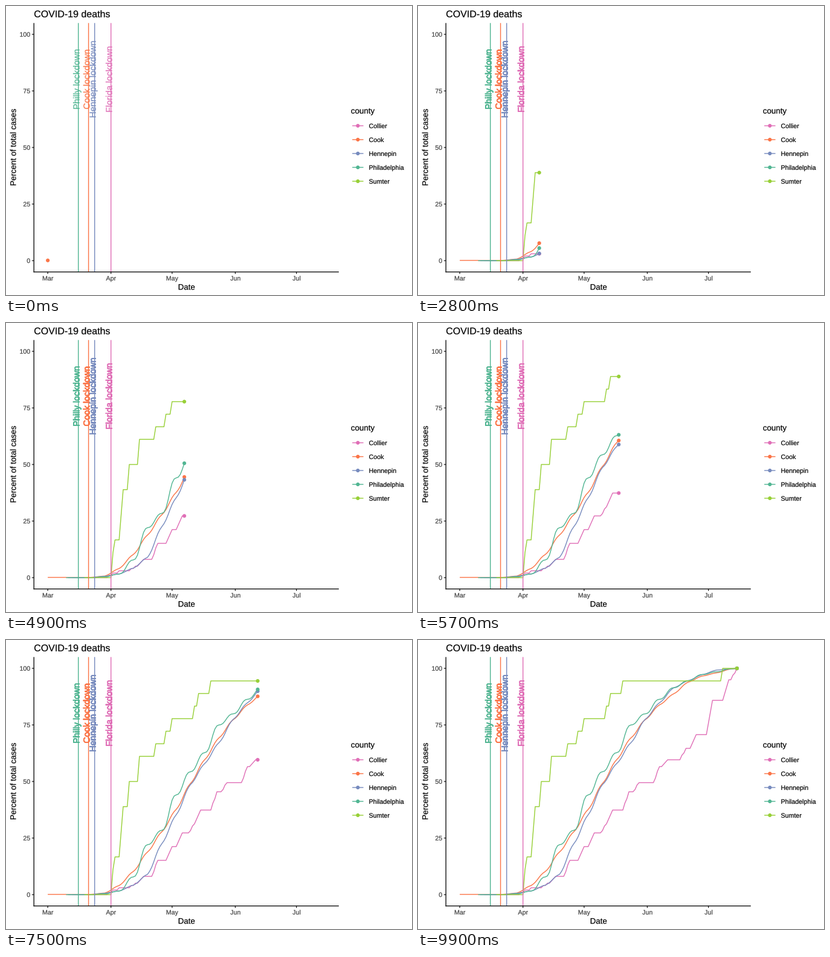
These frames come from a looping animation (672 by 480 pixels, 10 s). A matplotlib script:

```python
import matplotlib.pyplot as plt
import numpy as np
from matplotlib.animation import FuncAnimation
from matplotlib.patches import Circle, PathPatch
from matplotlib.textpath import TextPath
from matplotlib.transforms import Affine2D

W, H, DPI = 672, 480, 96
FRAMES, LAST = 100, 136
LEFT, RIGHT, TOP, BOTTOM = 46.2, 550.85, 28.3, 441.7
PT = 72 / DPI  # points per pixel
DAY = np.arange(LAST + 1)  # days since 1 March

PINK, ORANGE, BLUE = "#e06fb7", "#fb7548", "#778bbe"
TEAL, GREEN = "#52b693", "#98d038"
TICK, TICK_TEXT = "#242424", "#404040"

plt.rcParams.update({
    "path.snap": False,
    "lines.solid_capstyle": "butt",
    "lines.solid_joinstyle": "round",
})


def X(day):
    return LEFT + (day / LAST + 0.05) / 1.1 * (RIGHT - LEFT)


def Y(pct):
    return BOTTOM - (pct / 100 + 0.05) / 1.1 * (BOTTOM - TOP)


def weekly(rhythm, *levels):
    """Percent from levels seven days apart, slowing down every weekend."""
    weeks = 21 + 7 * np.arange(len(levels))
    pct = np.interp(DAY - rhythm * np.sin(2 * np.pi * DAY / 7), weeks, levels)
    return 100 * pct / pct[-1]


def steps(ramp, counts):
    """Percent from whole counts that climb to each key day, then hold."""
    days, level = [0], [0]
    for day, count in counts.items():
        days += [max(days[-1], day - ramp), day]
        level += [level[-1], count]
    return 100 * np.round(np.interp(DAY, days, level)) / level[-1]


# name, colour, first day with data, percent per day
SERIES = [
    ("Collier", PINK, 12, steps(3, {
        32: 2, 36: 3, 43: 5, 47: 8, 54: 15, 61: 21, 66: 27, 72: 31, 75: 37,
        83: 45, 88: 49, 98: 56, 102: 59, 111: 64, 116: 70, 124: 85, 132: 94,
        136: 99})),
    ("Cook", ORANGE, 0, weekly(
        0.4, 0.1, 0.7, 4, 10.2, 18.8, 27.7, 37.5, 48.9, 59.4, 69, 77, 83.5,
        88.4, 93.5, 96.2, 97.6, 99.3, 100)),
    ("Hennepin", BLUE, 10, weekly(
        0.4, 0, 0.6, 1.6, 4.2, 9, 22.5, 35.2, 48.5, 57.8, 67, 77.3, 84.6,
        91.2, 94.3, 97, 99, 99.6, 100)),
    ("Philadelphia", TEAL, 9, weekly(
        1, 0, 0.4, 1.6, 7.8, 22, 28.3, 43.9, 54.1, 62.5, 74.7, 79.6, 86,
        91.1, 94.2, 96.9, 98.1, 99.4, 100)),
    ("Sumter", GREEN, 18, steps(1, {
        32: 2, 33: 3, 36: 5, 37: 7, 40: 9, 45: 11, 53: 12, 58: 13, 61: 14,
        72: 15, 74: 16, 80: 17, 129: 18})),
]
LOCKDOWNS = [("Philly", TEAL, 15), ("Cook", ORANGE, 20),
             ("Hennepin", BLUE, 23), ("Florida", PINK, 31)]

fig = plt.figure(figsize=(W / DPI, H / DPI), dpi=DPI, facecolor="white")
ax = fig.add_axes([0, 0, 1, 1])
ax.set(xlim=(0, W), ylim=(H, 0))
ax.axis("off")


def line(x, y, color, width=1.42, z=2):
    return ax.plot(x, y, color=color, lw=width * PT, zorder=z)[0]


def dot(x, y, color):
    return ax.add_artist(Circle((x, y), 3.08, fc=color, lw=0, zorder=3))


def text(x, y, s, size, color="black", align=0, angle=0, z=6):
    """Outlined text on a baseline; align runs from 0 (left) to 1 (right)."""
    path = TextPath((0, 0), s, size=size, prop={"family": "Liberation Sans"})
    shift = -align * path.get_extents().x1
    place = Affine2D().translate(shift, 0).scale(1, -1).rotate_deg(-angle).translate(x, y)
    return ax.add_artist(PathPatch(path, fc=color, ec=color, lw=0.15, zorder=z,
                                   transform=place + ax.transData))


def draw_axes():
    text(LEFT, 18.7, "COVID-19 deaths", 16)
    text((LEFT + RIGHT) / 2, 471.2, "Date", 13.33, align=0.5)
    text(16.4, (TOP + BOTTOM) / 2, "Percent of total cases", 13.33, align=0.5, angle=90)
    for pct in range(0, 101, 25):
        y = Y(pct)
        line([LEFT - 3.33, LEFT], [y, y], TICK, 1.29)
        text(LEFT - 6.4, y + 3.83, str(pct), 10.67, TICK_TEXT, align=1)
    for month, day in zip(("Mar", "Apr", "May", "Jun", "Jul"), (0, 31, 61, 92, 122)):
        x = X(day)
        line([x, x], [BOTTOM, BOTTOM + 3.33], TICK, 1.29)
        text(x, 455.9, month, 10.67, TICK_TEXT, align=0.5)
    line([LEFT, LEFT], [TOP, BOTTOM + 0.6], "black", 1.29, 7)
    line([LEFT - 0.6, RIGHT], [BOTTOM, BOTTOM], "black", 1.29, 7)


def draw_legend():
    x = 570.85
    text(x, 178.6, "county", 13.33)
    for i, (name, color, _, _) in enumerate(SERIES):
        y = 198.9 + 23.04 * i
        line([x + 2.3, x + 20.74], [y, y], color)
        dot(x + 11.52, y, color)
        text(x + 29.7, y + 4, name, 10.67)


draw_axes()
draw_legend()
curves = [line([], [], color) for _, color, _, _ in SERIES]
heads = [dot(0, 0, color) for _, color, _, _ in SERIES]

# One stacked copy of each label per started series: edges thicken as they add up.
labels = [[] for _ in SERIES]
for i, (place, color, day) in enumerate(LOCKDOWNS):
    x = X(day)
    line([x, x], [TOP, BOTTOM], color, z=4 + i / 4)
    for copies in labels:
        copies.append(text(X(day - 1) + 5.3, Y(80), place + " lockdown", 14.72,
                           color, align=0.5, angle=90, z=4.1 + i / 4))

# Frame on which each day is revealed
reveal = np.round(DAY * (FRAMES - 1) / LAST)


def update(k):
    today = np.flatnonzero(reveal <= k)[-1]
    for (_, _, start, pct), curve, head, copies in zip(SERIES, curves, heads, labels):
        days = DAY[start:today + 1]
        curve.set_data(X(days), Y(pct[days]))
        head.set_center((X(today), Y(pct[today])))
        for artist in (head, *copies):
            artist.set_visible(bool(today >= start))
    return curves + heads


anim = FuncAnimation(fig, update, frames=FRAMES, interval=100, repeat=True,
                     repeat_delay=0, blit=False)
plt.show()
```
